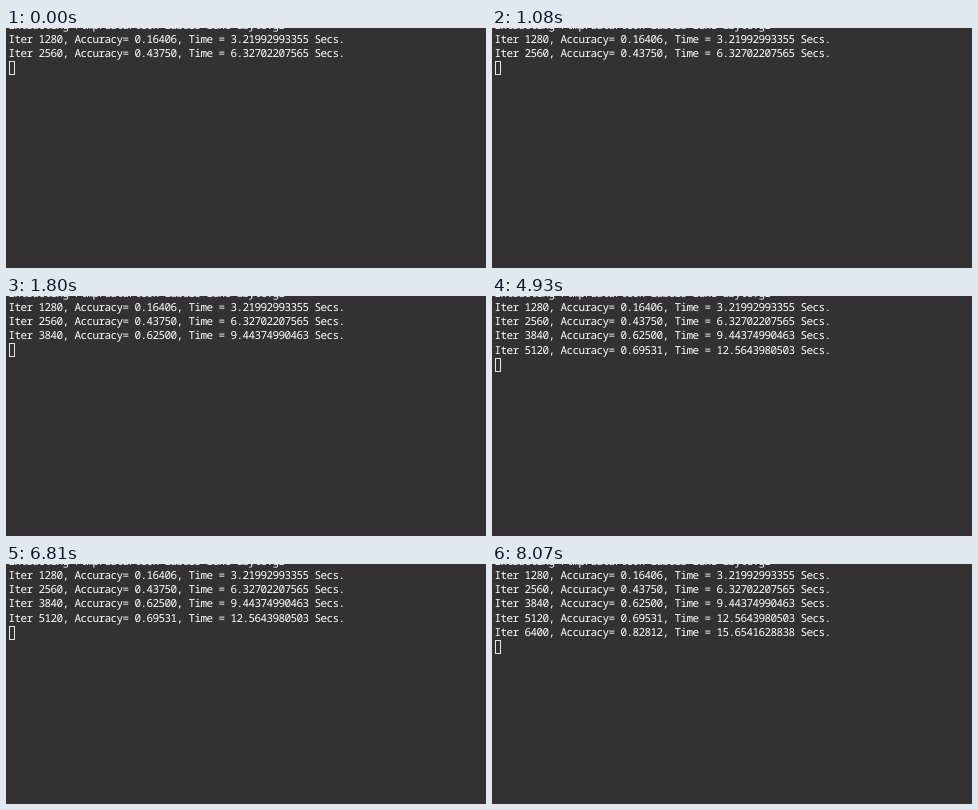
An HTML page with a canvas that plays this animation: 480 px wide and 240 px high, repeating every 8.59 s.

```html
<!DOCTYPE html>
<html lang="en">
<head>
<meta charset="utf-8">
<title>Training log</title>
<style>
  html, body { margin: 0; width: 100%; height: 100%; overflow: hidden; background: #333134; }
  canvas { display: block; }
</style>
</head>
<body>
<canvas id="stage" width="480" height="240"></canvas>
<script>
const ctx = document.getElementById('stage').getContext('2d');
const LOOP = 8590;
const LEFT = 2.5;
const FIRST_BASELINE = 0.5;
const PITCH = 14.3;

// Each result appears at its time within the loop.
const results = [
  { at: 0, accuracy: '0.16406', time: '3.21992993355' },
  { at: 0, accuracy: '0.43750', time: '6.32702207565' },
  { at: 1800, accuracy: '0.62500', time: '9.44374990463' },
  { at: 4930, accuracy: '0.69531', time: '12.5643980503' },
  { at: 8070, accuracy: '0.82812', time: '15.6541628838' }
];

const lines = [
  { at: 0, text: 'Extracting /tmp/data/t10k-labels-idx1-ubyte.gz' },
  ...results.map(({ at, accuracy, time }, i) => ({
    at,
    text: `Iter ${(i + 1) * 1280}, Accuracy= ${accuracy}, Time = ${time} Secs.`
  }))
];

const baseline = row => FIRST_BASELINE + row * PITCH;

function drawCursor(row) {
  const top = Math.round(baseline(row) - 10.3) + 0.5;
  ctx.strokeRect(3.5, top, 5, 13);
}

function draw(t) {
  ctx.fillStyle = '#333134';
  ctx.fillRect(0, 0, 480, 240);

  ctx.font = '500 11px "Noto Sans Mono", monospace';
  ctx.letterSpacing = '-0.6px';
  ctx.textRendering = 'geometricPrecision';
  ctx.fillStyle = '#fff';
  ctx.strokeStyle = '#e4e4e4';
  ctx.lineWidth = 1;

  const shown = lines.filter(line => line.at <= t);
  shown.forEach(({ text }, row) => ctx.fillText(text, LEFT, baseline(row)));
  drawCursor(shown.length);
}

const start = performance.now();
function tick() {
  draw((performance.now() - start) % LOOP);
  requestAnimationFrame(tick);
}
tick();
</script>
</body>
</html>
```
